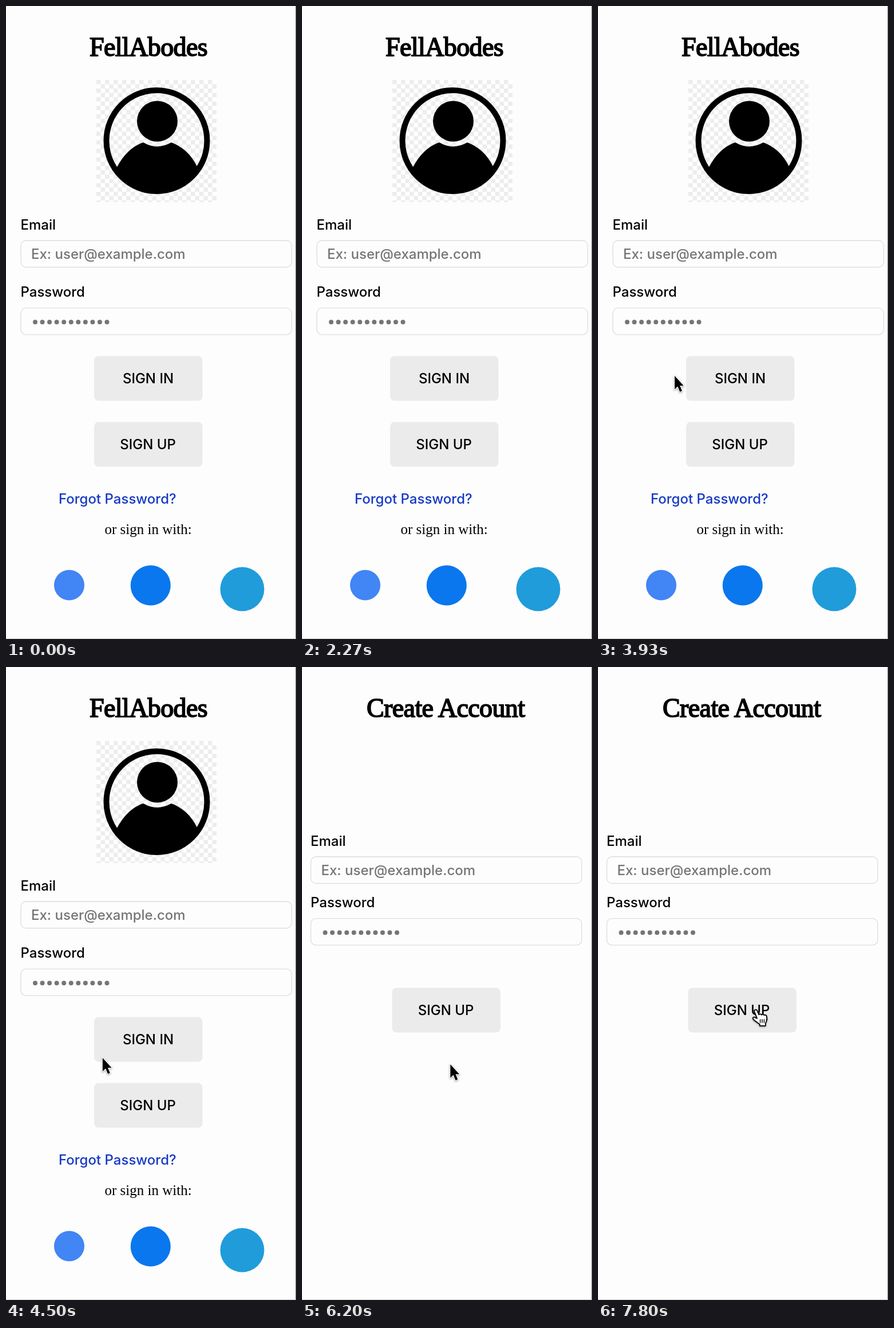
Recreate the animation shown at these times as an HTML page. Size 507 by 1104 pixels, loop 8000 ms.

```html
<!DOCTYPE html>
<html lang="en">
<head>
<meta charset="utf-8">
<title>Sign in and create account</title>
<style>
  html, body { margin: 0; width: 100%; height: 100%; overflow: hidden; background: #fdfdfd; }
  svg { display: block; width: 100vw; height: 100vh; }
  text { font: 500 24px Inter, sans-serif; }
  .title { font: 46px "Liberation Serif", serif; letter-spacing: -.6px; stroke: #000; stroke-width: 1.8; }
  .serif { font: 25px "Liberation Serif", serif; }
  .hint { fill: #757575; }
  .box { fill: #fdfdfd; stroke: #ddd; stroke-width: 1.3; }
  .button { fill: #ebebeb; }
  .button + text { text-anchor: middle; }
  #pointer { filter: drop-shadow(0 1.5px 1.5px rgba(0, 0, 0, .4)); }
</style>
</head>
<body>
<svg viewBox="0 0 507 1104">
  <defs>
    <pattern id="checker" x="158" y="129" width="15" height="15" patternUnits="userSpaceOnUse">
      <path fill="#fff" d="M0 0h15v15h-15z"/>
      <path fill="#ededed" d="M0 0h7.5v15h7.5v-7.5h-15z"/>
    </pattern>
    <g id="email">
      <text x="-.5" y="-.5">Email</text>
      <rect class="box" y="19" width="473.5" height="46.5" rx="9"/>
      <text class="hint" x="18" y="50.5">Ex: user@example.com</text>
    </g>
    <g id="password">
      <text x="-.5" y="-.5">Password</text>
      <rect class="box" y="19" width="473.5" height="46.5" rx="9"/>
      <path d="M25 43.5h126" fill="none" stroke="#757575" stroke-width="8"
            stroke-linecap="round" stroke-dasharray="0 12.55"/>
    </g>
    <g id="signUp">
      <rect class="button" width="189.5" height="78" rx="8"/>
      <text x="94" y="47.5">SIGN UP</text>
    </g>
  </defs>

  <rect width="507" height="1104" fill="#fdfdfd"/>

  <g id="loginScreen">
    <text class="title" x="146" y="87">FellAbodes</text>
    <rect x="158" y="129" width="210" height="213" fill="url(#checker)"/>
    <circle cx="263.5" cy="235" r="88" fill="none" stroke="#000" stroke-width="10"/>
    <circle cx="264.5" cy="201" r="35.5"/>
    <path d="M194 281C205 260 221 244 240 238Q264 252 289 238C308 245 324 259 334 280L325 298A88 88 0 0 1 202 298Z"/>
    <use href="#email" x="26" y="390"/>
    <use href="#password" x="26" y="507.7"/>
    <rect class="button" x="154" y="610.5" width="189.5" height="78" rx="8"/>
    <text x="248.5" y="658">SIGN IN</text>
    <use href="#signUp" x="154" y="725.5"/>
    <text x="92" y="868" fill="#1539c4">Forgot Password?</text>
    <text class="serif" x="172.5" y="921">or sign in with:</text>
    <circle cx="110.5" cy="1010" r="26.5" fill="#4285f4"/>
    <circle cx="252.8" cy="1010.5" r="35" fill="#0a77ee"/>
    <circle cx="413" cy="1017" r="38.5" fill="#209cdb"/>
  </g>

  <g id="createScreen">
    <text class="title" x="113" y="87">Create Account</text>
    <use href="#email" x="15.5" y="312"/>
    <use href="#password" x="15.5" y="419.7"/>
    <use href="#signUp" x="157.5" y="559.5"/>
  </g>

  <path d="M506.5 0V1104" stroke="#8c8c8c"/>
  <path d="M0 1103.5H507" stroke="#ccc"/>

  <g id="pointer" stroke-linejoin="round">
    <path id="arrow" stroke="#fff" stroke-width="2.4" paint-order="stroke"
          d="M0 0V23.5L5.3 18.6 9.2 28 13 26.3 9.2 17.3H15.8Z"/>
    <g id="hand" transform="translate(-6.7 -1.7)" fill="#fff" stroke="#000" stroke-width="1.8">
      <path d="M4 4.5C3.5 1 8 .5 9 3L12 10C14 8.5 16 9 16.5 10.5C18 9 20.5 9.5 21 11C23 10 25 11 25.5 13
               C26.5 16 26.5 18 25 22L23.5 25V29.5H13.5V27L4 20C1.5 17.5 .5 16.5 2 15C3.5 14 5.5 14.5 7 16L8.8 16.5Z"/>
      <path d="M14.3 18v6.5m3.4-6.5v6.5m3.4-6.5v6.5" stroke-width="1.4"/>
    </g>
  </g>
</svg>

<script>
  const LOOP = 8000, SWITCH = 5530, ENTER = 2560;
  // Pointer tip as [time, x, y]
  const route = [
    [ENTER, 512, 575], [2930, 229, 630], [3450, 140, 642], [3930, 134, 645], [4250, 136, 650],
    [4950, 248, 758], [5200, 252, 767], [5960, 252, 767], [6750, 285, 434], [6930, 286, 433],
    [7560, 279, 576], [7630, 279, 576], [7790, 276, 598], [LOOP, 276, 598]
  ];
  const byId = id => document.getElementById(id);
  const show = (id, visible) => byId(id).style.display = visible ? '' : 'none';

  function tipAt(time) {
    const next = Math.max(1, route.findIndex(([at]) => at >= time));
    const [t0, x0, y0] = route[next - 1], [t1, x1, y1] = route[next];
    const p = Math.max(0, (time - t0) / (t1 - t0));
    const ease = p * p * (3 - 2 * p);
    return [x0 + (x1 - x0) * ease, y0 + (y1 - y0) * ease];
  }

  function draw(now) {
    const time = now % LOOP;
    const created = time >= SWITCH;
    const [x, y] = tipAt(time);
    // The hand lingers after the switch until the pointer moves again.
    const hand = time < 5970 ? x > 154 && y > 725 : time > 7000 && y > 560;
    show('loginScreen', !created);
    show('createScreen', created);
    show('pointer', time >= ENTER);
    show('hand', hand);
    show('arrow', !hand);
    byId('pointer').setAttribute('transform', `translate(${x} ${y})`);
    requestAnimationFrame(draw);
  }
  requestAnimationFrame(draw);
</script>
</body>
</html>
```
